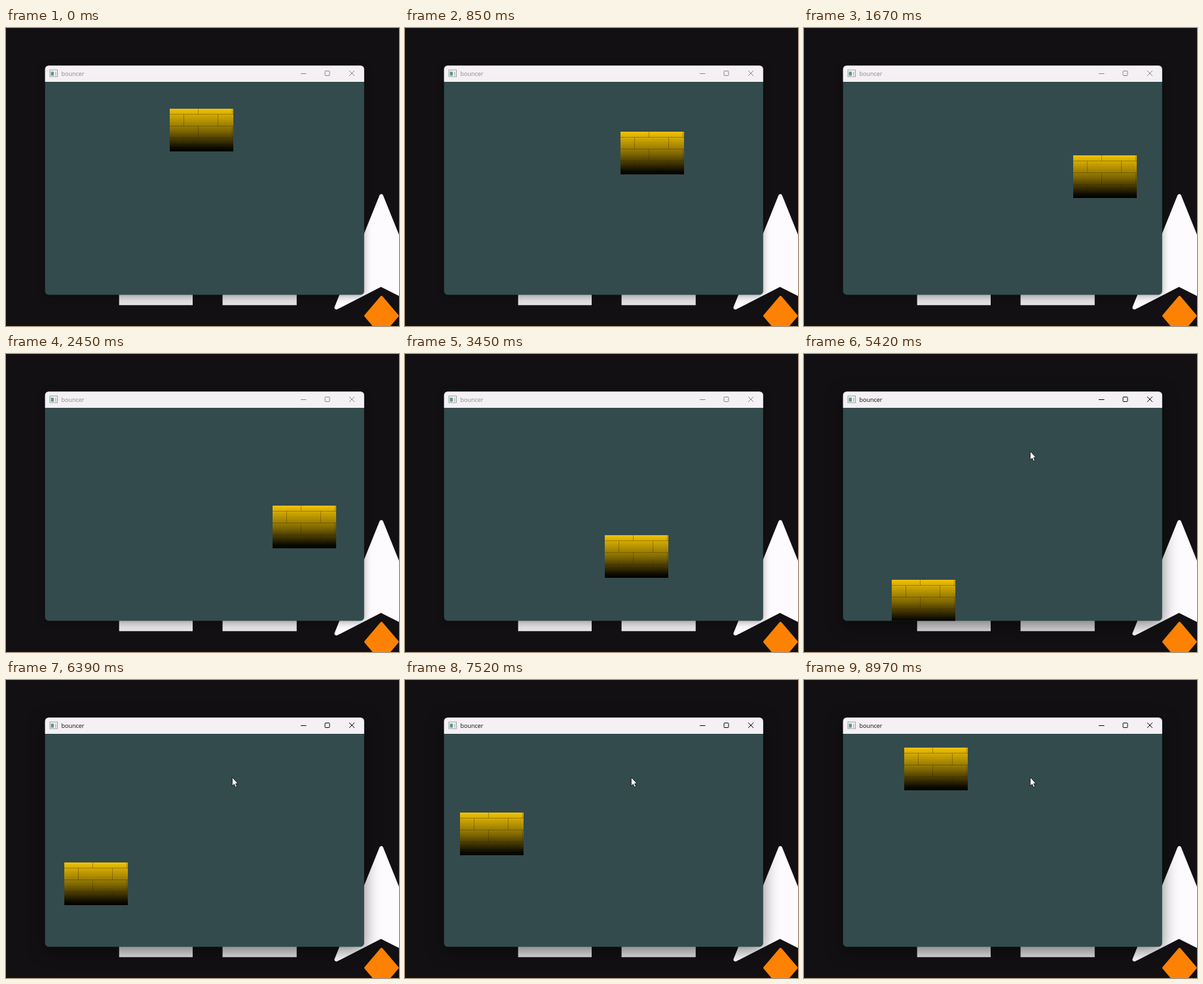
These frames come from a looping animation (600x454 px, 9000 ms). An HTML page:

```html
<!DOCTYPE html>
<html lang="en">
<head>
<meta charset="utf-8">
<title>bouncer</title>
<style>
  html, body { margin: 0; width: 100%; height: 100%; overflow: hidden; background: #121013; }
  svg { display: block; width: 600px; height: 454px; }
  text { font: 9px "Open Sans", "Noto Sans", sans-serif; }
  #frame { filter: drop-shadow(0 2px 6px rgba(0, 0, 0, .35)); }
  #win { color: #8b888b; }
  #win.active { color: #0c0c0c; }
  #win.active #frame { filter: drop-shadow(0 6px 12px rgba(0, 0, 0, .5)); }
</style>
</head>
<body>
<svg viewBox="0 0 600 454">
  <defs>
    <linearGradient id="gold" x2="0" y2="1">
      <stop stop-color="#f2c300"/>
      <stop offset=".5" stop-color="#846b00"/>
      <stop offset=".92" stop-color="#0c0a00"/>
      <stop offset="1" stop-color="#000"/>
    </linearGradient>
    <clipPath id="shape"><rect x="59.600" y="57.200" width="487.200" height="349.200" rx="5.500"/></clipPath>
  </defs>

  <!-- desktop -->
  <rect width="600" height="454" fill="#121013"/>
  <path d="M172.700 390H285V422.300H172.700ZM330.600 390H443.800V422.300H330.600Z" fill="#e2e2e2"/>
  <g stroke-linejoin="round">
    <path d="M573 256 504.500 425.800 572.500 391 641.500 425.800Z" fill="#fdfbfe" stroke="#fdfbfe" stroke-width="6"/>
    <path d="M573.300 410 549 438.500 573.300 467 597.600 438.500Z" fill="#fd8204" stroke="#fd8204" stroke-width="4"/>
  </g>

  <!-- window -->
  <g id="win">
    <rect id="frame" x="59.600" y="57.200" width="487.200" height="349.200" rx="5.500" fill="#334b4d"/>
    <g clip-path="url(#shape)">
      <rect x="59" y="57" width="489" height="25" fill="#f4f0f4"/>
      <g id="brick">
        <rect width="97" height="65" fill="url(#gold)"/>
        <g id="mortar" stroke="#2a2000" stroke-opacity=".32"></g>
      </g>
    </g>
    <rect x="67" y="64" width="11.500" height="10" fill="#fafafa" stroke="#9a9c9e"/>
    <path d="M68.500 66.500H73V72.500H68.500Z" fill="#5d958f"/>
    <path d="M74.500 66.500H77V72.500H74.500Z" fill="#c4c9cc"/>
    <text x="84.500" y="73" fill="currentColor">bouncer</text>
    <g fill="none" stroke="currentColor">
      <path d="M450 69.500H458.500M524 65 532 73M532 65 524 73"/>
      <rect x="487" y="65.500" width="7" height="7" rx="1"/>
    </g>
  </g>

  <path id="cursor" d="M.3 0V13.500L3.300 10.700 5.400 15.300 7.600 14.300 5.600 9.900H9.300Z" fill="#fff" stroke="#111" stroke-width=".9" stroke-linejoin="round"/>
</svg>
<script>
const LOOP = 9000, ENTER = 4275, FOCUS = 4650, TURN = 5300, REST = 5400;
const LEFT = 60, SPAN = 389.5;   // horizontal travel of the brick
const $ = id => document.getElementById(id);

// Running bond: alternate rows shift their joints by half a brick.
let joints = "";
for (let row = 0; row < 4; row++) {
  const top = row ? 18 * row - 9.5 : 0, bottom = 18 * row + 8.5;
  if (row < 3) joints += `M0 ${bottom}H97`;
  for (let x = row % 2 ? 21.5 : 43.5; x < 97; x += 52) joints += `M${x} ${top}V${Math.min(bottom, 56)}`;
}
$("mortar").innerHTML = `<path d="${joints}"/>`;

// Reflects an unbounded coordinate between the side walls.
function bounce(x) {
  const turn = 2 * SPAN, r = ((x % turn) + turn) % turn;
  return LEFT + Math.min(r, turn - r);
}

function brickAt(t) {
  if (t < TURN) {
    // steady speed with a slight drift in pace
    const travel = .0982 * t - 5 * Math.sin(2 * Math.PI * t / 4450);
    return [bounce(190 + travel), 123 + .444 * travel];
  }
  const y = 103 + .068 * (8970 - t);
  return [bounce(.69 * (y - 237)), y];
}

function cursorAt(t) {
  const k = Math.min(1, Math.max(0, (t - ENTER) / (REST - ENTER)));
  const left = (1 - k) ** 1.75;
  return [345 + 63 * left, 148 - 139 * left];
}

function place(id, pos) {
  $(id).setAttribute("transform", `translate(${pos.map(Math.round)})`);
}

const start = performance.now();
function draw(now) {
  const t = Math.max(0, now - start) % LOOP;
  place("brick", brickAt(t));
  place("cursor", cursorAt(t));
  $("cursor").style.visibility = t < ENTER ? "hidden" : "visible";
  $("win").classList.toggle("active", t >= FOCUS);
  requestAnimationFrame(draw);
}
draw(start);
</script>
</body>
</html>
```
